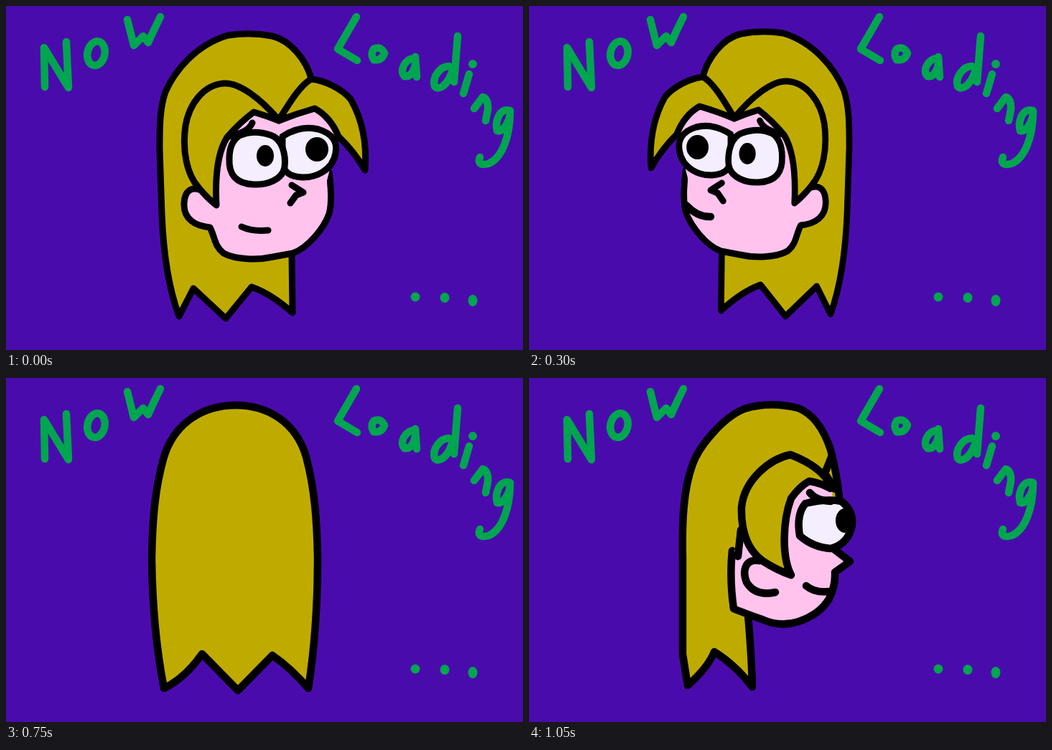
An HTML page without scripts for the animation above (1.2 s loop, 720x480 px).

```html
<!DOCTYPE html>
<html lang="en">
<head>
<meta charset="utf-8">
<title>Now Loading</title>
<style>
html, body { margin: 0; width: 100%; height: 100%; overflow: hidden; background: #4a0bad; }
svg { display: block; width: 100vw; height: 100vh; }
path, ellipse { stroke-linecap: round; stroke-linejoin: round; }
.hair, .skin, .eye, .line { stroke: #000; stroke-width: var(--pen, 10.5px); }
.hair { fill: #bfab00; }
.skin { fill: #ffc3ee; }
.eye { fill: #f4eeff; }
.line { fill: none; }
.bare { stroke: none; }
.fine { --pen: 9px; }
.ink { fill: none; stroke: #00a54f; stroke-width: 10.5; }
.dot { fill: #00a54f; }

/* eight poses, one shown at a time */
.pose {
  visibility: hidden;
  animation: show 1200ms step-end infinite;
  animation-delay: calc((var(--i) - 8) * 150ms);
}
@keyframes show {
  0% { visibility: visible; }
  12.5%, 100% { visibility: hidden; }
}
</style>
</head>
<body>
<svg viewBox="0 0 720 480" role="img" aria-label="Now Loading...">
<defs>
  <!-- head half turned to the right -->
  <g id="half" class="fine">
    <path class="hair" d="M425 101C418 75 396 48 371 42Q340 36 309 41C265 54 235 90 222 120C214 142 214 170 214 200L217 290C219 340 225 390 241 433L261 394 306 436 342 392Q370 402 399 428L398 345"/>
    <path class="skin" d="M450 232C453 255 454 275 450 290C443 310 420 338 399 345L372 350C350 355 320 354 303 345C290 335 291 322 284 309C264 307 247 298 248 275C249 256 260 252 272 257"/>
    <path class="skin bare" d="M272 257L310 180 345 148 380 160 430 143 463 182 450 232 440 270 290 280Z"/>
    <path class="hair" d="M380 159C355 130 325 106 303 108C275 110 255 137 250 167C245 202 252 235 268 253Q280 268 293 278C291 238 294 205 308 183Q325 163 345 148Q362 153 380 160"/>
    <path class="hair" d="M380 159C395 135 410 110 425 102C445 104 468 116 480 130C496 158 503 190 500 229Q485 203 463 182Q452 155 430 143Q405 150 380 160"/>
    <path class="eye" d="M385 182Q410 166 435 172C455 178 462 190 459 205C455 230 430 240 412 239C395 238 388 232 385 220Z"/>
    <path class="eye" d="M325 181Q345 172 368 180C385 185 390 208 388 225C385 243 362 250 345 249C320 248 310 235 311 213Q311 190 325 181Z"/>
    <ellipse cx="361" cy="209" rx="12" ry="15"/>
    <ellipse cx="433" cy="200" rx="16" ry="17"/>
    <path class="line" d="M343 163Q338 176 310 182M398 250L414 260 404 264 396 275"/>
  </g>

  <!-- head almost in profile, to the right -->
  <g id="turn">
    <path class="hair" d="M432 165Q428 130 420 100C410 70 395 50 375 42Q335 32 300 43C270 55 237 95 228 120C215 155 213 200 214 250L214 385 221 429Q250 403 258 382Q287 400 311 431Q310 390 305 330"/>
    <path class="skin" d="M283 241Q279 280 285 322Q300 328 325 337Q350 348 375 340Q405 330 418 308Q427 290 426 271L447 256 425 239"/>
    <path class="skin bare" d="M286 241L300 210 360 170 390 146 422 156 425 238 400 280 300 280Z"/>
    <path class="hair" d="M420 150Q408 124 364 107C335 113 300 142 296 180C295 215 305 240 325 255Q345 268 365 275C352 250 353 200 365 168Q377 151 390 144Q405 146 420 154"/>
    <path class="line" d="M295 212L291 249M422 108L412 133 426 155M322 255C300 251 297 270 303 285Q315 305 343 299M386 290Q398 300 417 298"/>
    <path class="eye" d="M385 175Q415 168 435 172Q452 185 450 205Q445 232 420 238Q395 236 377 220Q372 190 385 175Z"/>
    <ellipse cx="440" cy="199" rx="13" ry="17"/>
    <path class="line" d="M391 160Q400 171 420 172"/>
  </g>

  <!-- full profile, to the right -->
  <path id="sideHair" class="hair" d="M432 150C428 110 410 60 366 43Q330 36 295 42C265 48 242 62 230 85C210 122 203 160 202 200L197 240 197 300Q202 375 218 428Q242 422 275 385L329 428 348 380 376 420 372 408 373 340"/>
  <g id="sideFace">
    <path class="skin bare" d="M350 340L368 200 390 150 425 155 425 245 400 325Z"/>
    <path class="skin" d="M348 343Q375 337 400 325Q423 310 420 276L418 268 425 268 434 249 415 238"/>
    <path class="hair" d="M432 152Q395 128 352 110Q342 113 330 138C315 165 315 200 325 225C333 245 350 258 372 266Q364 235 368 195Q375 165 388 153Q400 145 415 152L432 160"/>
    <path class="eye" d="M420 162C399 174 395 214 410 229L420 237C440 230 455 212 456 192C454 172 438 160 420 162Z"/>
    <ellipse cx="446" cy="194" rx="15" ry="20"/>
  </g>
</defs>

<rect width="720" height="480" fill="#4a0bad"/>

<g class="ink">
  <path d="M54 113L53 58 87 114 84 50"/>
  <ellipse cx="125.500" cy="66" rx="12" ry="17" transform="rotate(12 125 66)"/>
  <path d="M169 19L178 55 191 42 198 51Q206 33 215 15"/>
  <path d="M488 15L462 60 489 76"/>
  <path d="M512 60Q522 55 527 66Q523 77 512 75Q507 67 512 60Z"/>
  <path d="M568 73C556 74 547 90 555 98C565 100 572 85 570 71L572 99"/>
  <path d="M617 84C605 84 593 99 597 112C603 119 615 110 621 92M629 42L624 106"/>
  <path d="M645 95L637 122M652 143L664 127Q672 130 671 145L668 160"/>
  <path d="M702 146C686 141 681 163 684 174C693 177 703 158 702 146C702 182 691 212 672 220Q655 224 660 211"/>
</g>
<g class="dot">
  <circle cx="650" cy="81" r="6"/>
  <ellipse cx="570" cy="406" rx="6.500" ry="6.500"/>
  <ellipse cx="611" cy="407" rx="6.500" ry="7"/>
  <ellipse cx="650" cy="411" rx="6.500" ry="8"/>
</g>

<g class="pose" style="--i:0">
  <use href="#half"/>
  <path class="line fine" d="M328 308Q343 315 365 313"/>
</g>

<g class="pose" style="--i:1">
  <path class="hair" d="M240 97C252 70 285 41 322 31L342 33C380 42 410 65 425 99L340 160Z"/>
  <path class="hair" d="M230 297L233 350 238 434Q245 417 277 384L334 438 384 393Q405 407 431 436Q432 380 437 305"/>
  <path class="skin" d="M243 252Q232 246 222 258C218 275 222 292 238 299L245 297C250 330 275 344 318 351Q342 354 365 351C395 347 420 337 428 318L433 298 437 305 447 307C457 298 460 275 452 260C445 250 434 253 432 262"/>
  <path class="skin bare" d="M247 268L262 170 300 143 340 160 400 143 440 210 446 268Z"/>
  <path class="line" d="M432 262Q434 254 447 254"/>
  <path class="hair" d="M340 162C325 130 302 96 278 89C240 85 205 120 198 165C195 200 201 225 215 248Q232 263 252 273C247 235 247 197 263 171Q282 150 301 143Q320 150 340 162"/>
  <path class="hair" d="M340 162C350 135 375 103 405 95C440 93 462 140 465 185Q467 222 452 250L446 246C440 210 428 170 405 147Q385 141 340 162"/>
  <path class="line" d="M227 254Q236 248 243 253"/>
  <path class="eye" d="M272 174C290 168 320 170 331 190C340 210 336 238 318 244C298 249 268 247 260 235Q256 195 272 174Z"/>
  <path class="eye" d="M361 178C375 169 402 169 413 182C423 195 424 215 415 227C405 241 382 244 368 241C350 235 342 222 343 206Q346 188 361 178Z"/>
  <ellipse cx="296" cy="206" rx="15" ry="19"/>
  <ellipse cx="385" cy="207" rx="17" ry="18"/>
  <path class="line" d="M309 158Q300 167 275 167M343 242L349 256 340 268M283 303Q297 312 317 310"/>
</g>

<g class="pose" style="--i:2">
  <use href="#half" transform="matrix(-.965 0 0 1 652.500 -3)"/>
  <path class="line" d="M219 278Q235 295 253 294"/>
</g>

<g class="pose" style="--i:3">
  <use href="#turn" transform="matrix(-.965 0 0 1 612 -3)"/>
</g>

<g class="pose" style="--i:4">
  <use href="#sideHair" transform="matrix(-.96 0 0 1 622 -2)"/>
  <path class="skin bare" d="M265 200L318 190 325 250 330 246 322 323 280 334 260 325Z"/>
  <path class="line" d="M319 190Q324 220 325 250L330 246Q326 290 322 323Q300 333 275 331"/>
  <use href="#sideFace" transform="matrix(-.96 0 0 1 622 -2)"/>
  <path class="skin bare" d="M275 328L270 292 282 250 305 245 320 250 317 320Z"/>
  <path class="line" d="M280 251L291 243Q308 246 311 257C311 277 295 289 270 292"/>
</g>

<g class="pose" style="--i:5">
  <path class="hair" d="M320 38C275 38 235 62 220 110C207 155 204 200 203 250Q204 350 220 433Q250 418 273 385L323 436 371 387Q397 405 421 433Q434 350 434 250C433 200 430 155 418 110C404 62 365 38 320 38Z"/>
</g>

<g class="pose" style="--i:6">
  <use href="#sideHair"/>
  <path class="skin bare" d="M344 248L372 266 400 325 350 343Z"/>
  <use href="#sideFace"/>
  <path class="line" d="M342 246L351 341M345 248L351 276M352 287L372 295M405 287L419 289M425 165Q440 164 451 157"/>
</g>

<g class="pose" style="--i:7">
  <use href="#turn"/>
</g>
</svg>
</body>
</html>
```
